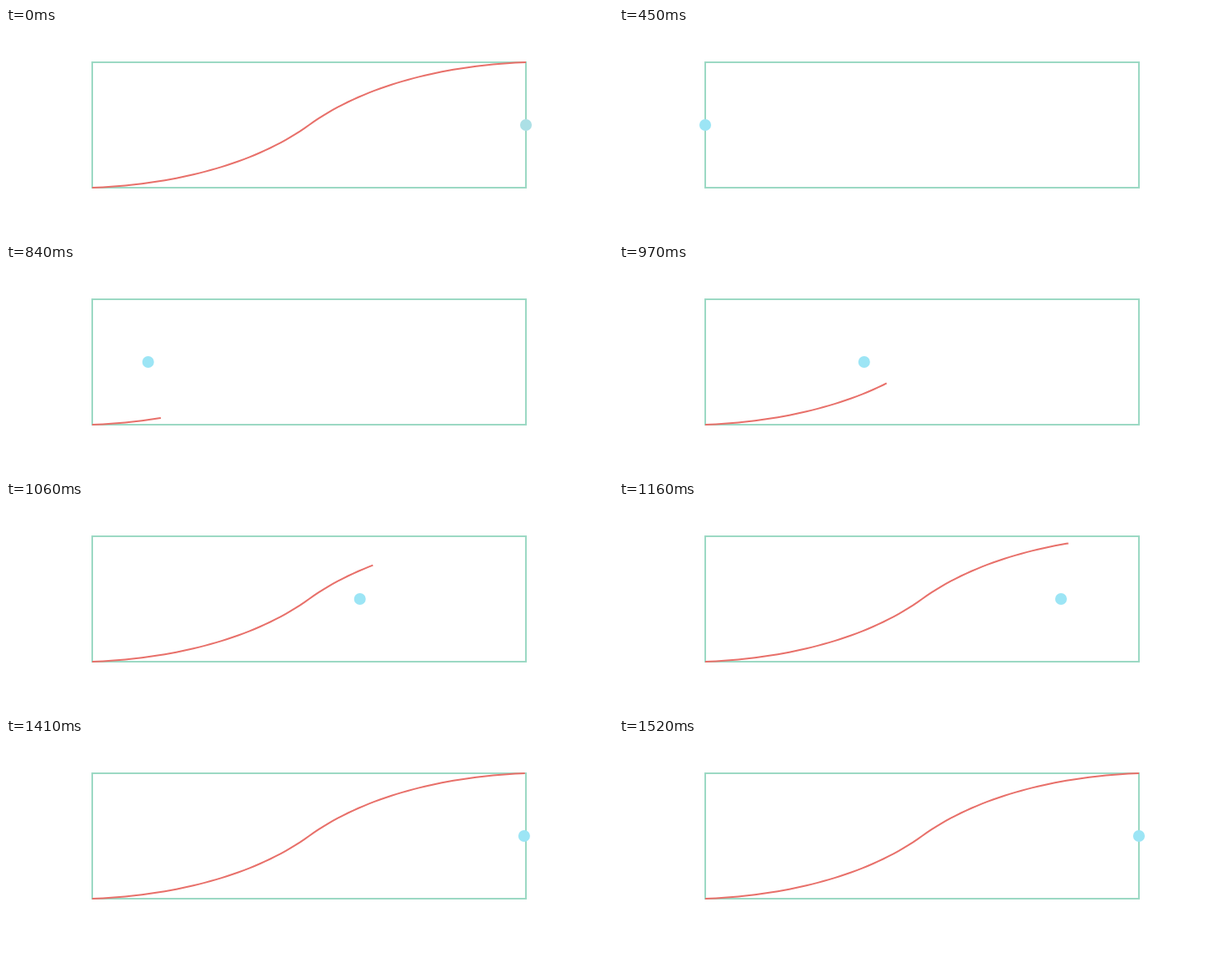
An HTML page with a canvas that plays this animation: 725x250 px, repeating every 2020 ms.

```html
<!DOCTYPE html>
<html lang="en">
<head>
<meta charset="utf-8">
<title>Ease in and out</title>
<style>
  html, body { margin: 0; width: 100%; height: 100%; overflow: hidden; background: #fff; }
  canvas { display: block; }
</style>
</head>
<body>
<canvas id="stage" width="725" height="250"></canvas>
<script>
const ctx = document.getElementById('stage').getContext('2d');
const LOOP = 2020, RESET = 450, START = 529, DURATION = 980.5;
const LEAD = 0.017; // the line runs one tick ahead of the dot
const STEPS = 40;
const box = { x: 103, y: 41, w: 518, h: 150 };
const mid = { x: box.x + box.w / 2, y: box.y + box.h / 2 };

function bezier(a, b, c, d, t) {
  const u = 1 - t;
  return u * u * u * a + 3 * u * u * t * b + 3 * u * t * t * c + t * t * t * d;
}

// Lower half of the curve; the upper half is its reflection through the centre.
const half = [];
for (let i = 0; i <= STEPS; i++) {
  half.push({
    x: bezier(box.x, 188, 290, mid.x, i / STEPS),
    y: bezier(box.y + box.h, 188, 168, mid.y, i / STEPS)
  });
}
const reflect = p => ({ x: 2 * mid.x - p.x, y: 2 * mid.y - p.y });
const curve = [...half, ...half.slice(0, -1).reverse().map(reflect)];
const length = curve.slice(1).reduce(
  (sum, p, i) => sum + Math.hypot(p.x - curve[i].x, p.y - curve[i].y), 0);

function progress(ms) {
  if (ms < RESET) return 1;
  return Math.min(1, Math.max(0, (ms - START) / DURATION));
}

function easeInOutCubic(t) {
  return t < 0.5 ? 4 * t ** 3 : 1 - 4 * (1 - t) ** 3;
}

function drawCurve(part) {
  ctx.save();
  if (part < 1) ctx.setLineDash([part * length, length * 2]);
  ctx.strokeStyle = '#e8706a';
  ctx.beginPath();
  curve.forEach(p => ctx.lineTo(p.x, p.y));
  ctx.stroke();
  ctx.restore();
}

function drawDot(part, color) {
  ctx.fillStyle = color;
  ctx.beginPath();
  ctx.arc(box.x + box.w * part, mid.y, 7, 0, Math.PI * 2);
  ctx.fill();
}

function draw(ms) {
  const p = progress(ms);
  ctx.fillStyle = '#fff';
  ctx.fillRect(0, 0, 725, 250);
  ctx.lineWidth = 2;
  ctx.strokeStyle = '#9cd9c4';
  ctx.strokeRect(box.x, box.y, box.w, box.h);
  if (p > 0) drawCurve(easeInOutCubic(Math.min(1, p + LEAD)));
  drawDot(easeInOutCubic(p), ms < RESET ? '#ace0e6' : '#9ce5f5');
}

const start = performance.now();
function tick() {
  draw((performance.now() - start) % LOOP);
  requestAnimationFrame(tick);
}
tick();
</script>
</body>
</html>
```
